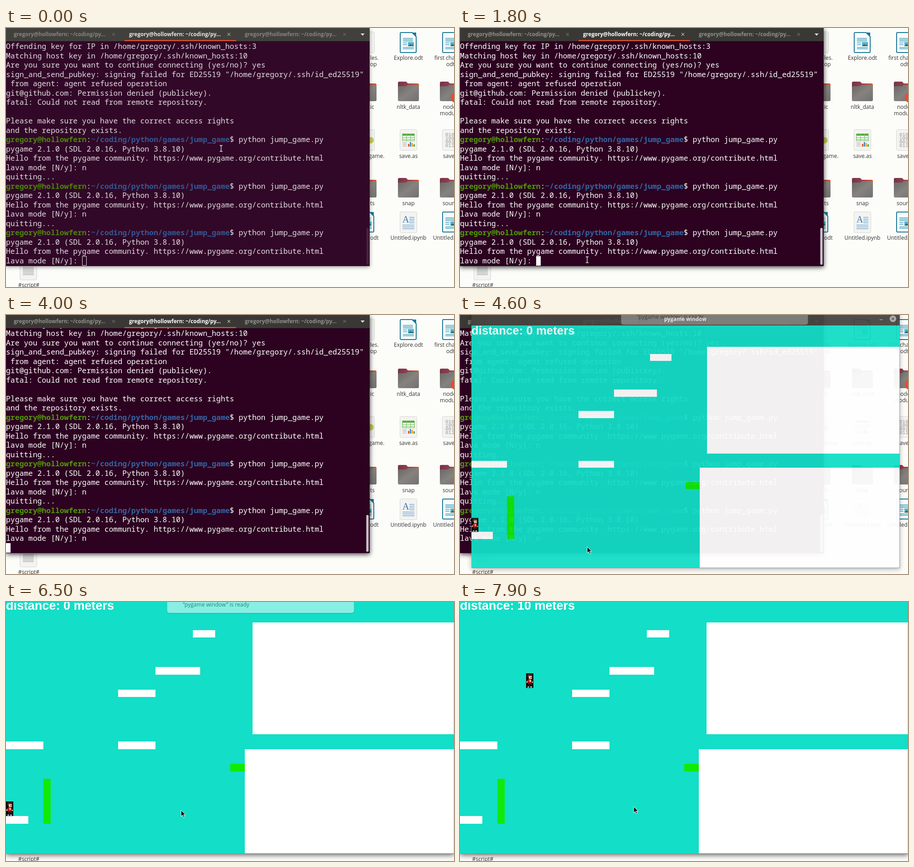
Recreate the animation shown at these times as an HTML page. Size 983 by 570 pixels, loop 8 s.

```html
<!DOCTYPE html>
<html lang="en">
<head>
<meta charset="utf-8">
<title>Jump game</title>
<style>
html, body { margin: 0; width: 100%; height: 100%; overflow: hidden; background: #fcfcf9; }
svg { display: block; width: 983px; height: 570px; }
text { white-space: pre; font: 12px "Open Sans", "Noto Sans", sans-serif; fill: #333; }
.term text { font: 16.38px "Noto Sans Mono", "DejaVu Sans Mono", monospace; fill: #fff; }
.term .user { font-weight: bold; fill: #4e9a06; }
.term .path { font-weight: bold; fill: #3465a4; }
.tabs text { font-weight: bold; font-size: 11.6px; }
.bar text { font-weight: bold; fill: #e6e5e2; }
.bar text.score { font: bold 27px "Liberation Sans", Arial, sans-serif; fill: #fff; }
.bits { font: 11px "Liberation Mono", monospace; fill: #999; }
.letter { font: 20px "Liberation Serif", serif; fill: #2f76b5; }
.level { shape-rendering: crispEdges; }
</style>
</head>
<body>
<svg id="stage" viewBox="0 0 983 570"></svg>
<script>
const stage = document.getElementById('stage');

function el(tag, attrs, parent = stage, content) {
  const node = document.createElementNS('http://www.w3.org/2000/svg', tag);
  for (const k in attrs) node.setAttribute(k, attrs[k]);
  if (content !== undefined) node.textContent = content;
  parent.append(node);
  return node;
}
const group = (parent, attrs = {}) => el('g', attrs, parent);
const rect = (p, x, y, width, height, fill, more) => el('rect', { x, y, width, height, fill, ...more }, p);
const path = (p, d, fill, more) => el('path', { d, fill, ...more }, p);
const text = (p, x, y, s, more) => el('text', { x, y, ...more }, p, s);
const show = (node, on) => node.setAttribute('visibility', on ? 'visible' : 'hidden');
const fade = (node, a) => node.setAttribute('opacity', a);

// Desktop
const defs = el('defs', {});
function gradient(id, stops, more) {
  const g = el('linearGradient', { id, ...more }, defs);
  stops.forEach((c, i) => el('stop', { offset: i / (stops.length - 1), 'stop-color': c }, g));
}
gradient('folder', ['#686765', '#85827f', '#737170'], { x2: 1, y2: 1 });
gradient('tab', ['#74334a', '#98404b', '#e3562f']);

const desk = group();
rect(desk, 0, 0, 983, 570, '#fcfcf9');

function lines(p, x, y, w, n, gap, color) {
  for (let i = 0; i < n; i++) rect(p, x, y + i * gap, w, 1.4, color);
}
function page(x, y) {
  const g = group(desk, { transform: `translate(${x} ${y})` });
  rect(g, .5, .5, 37, 46, '#f3f3f1', { rx: 3, stroke: '#d6d6d3' });
  return g;
}
function writer(x, y) {
  const g = group(desk, { transform: `translate(${x} ${y})` });
  path(g, 'M3 1H27L36 10V43Q36 45 34 45H3Q1 45 1 43V3Q1 1 3 1Z', '#fafcfc', { stroke: '#1b7899', 'stroke-width': 2 });
  path(g, 'M27 1L36 10V1Z', '#1b7899');
  lines(g, 7, 13, 22, 3, 3, '#3a9cba');
  rect(g, 7, 23, 9, 1.4, '#3a9cba');
  rect(g, 7, 27, 9, 1.4, '#3a9cba');
  rect(g, 18, 22, 13, 9, '#52b3cc');
  path(g, 'M18 31L23 26L26 29L28 27L31 31Z', '#2c6f62');
  lines(g, 7, 33, 24, 2, 3, '#3a9cba');
}
function folder(x, y) {
  const g = group(desk, { transform: `translate(${x} ${y})` });
  path(g, 'M3 0H18L22 4H43Q46 4 46 7V20H0V3Q0 0 3 0Z', 'url(#tab)');
  path(g, 'M0 12Q0 10 3 10H17L22 7H44Q46 7 46 9V40Q46 43 43 43H3Q0 43 0 40Z', 'url(#folder)');
}

page(771, 8);
writer(864, 9);
writer(957, 9);
for (const y of [118, 330]) for (const x of [767, 860, 952]) folder(x, y);
el('circle', { cx: 988, cy: 153, r: 12, fill: '#ee4a32' }, desk);

const play = page(771, 223);
el('circle', { cx: 29, cy: 24, r: 7, fill: '#c3cb55' }, play);

const sheet = page(864, 223);
rect(sheet, 6, 10, 26, 15, '#fff', { stroke: '#56a83f' });
rect(sheet, 6, 10, 26, 4, '#4dac35');
lines(sheet, 6, 17, 26, 2, 4, '#7fc46c');
for (const x of [14, 23]) rect(sheet, x, 10, 1.2, 15, '#7fc46c');
[[18, 6, '#e2572e'], [22, 10, '#3d8fc4'], [26, 8, '#e9a52d'], [30, 5, '#4dac35']]
  .forEach(([x, h, c]) => rect(sheet, x, 38 - h, 3, h, c));
lines(sheet, 6, 29, 9, 3, 3.5, '#b7b7b4');

const binary = page(957, 223);
['0100', '1001', '0010', '0110'].forEach((s, i) => text(binary, 7, 15 + i * 8, s, { class: 'bits' }));

writer(771, 404);
writer(957, 404);
const note = page(864, 404);
text(note, 6, 24, 'A', { class: 'letter' });
lines(note, 21, 12, 11, 4, 4, '#6ea3cf');
lines(note, 6, 29, 26, 3, 4, '#6ea3cf');
const script = page(30, 508);
lines(script, 7, 18, 24, 6, 3.2, '#aaa');

[[883, 70, 'Explore.odt'], [883, 178, 'nltk_data'], [883, 286, 'save.as'], [883, 390, 'snap'],
 [883, 466, 'Untitled.ipynb'], [50, 570, '#script#']]
  .forEach(([x, y, s]) => text(desk, x, y, s, { 'text-anchor': 'middle' }));
[[799, 70, 'les.'], [799, 84, 'op'], [799, 178, 'ic'], [796, 286, 'game.'], [799, 390, 'ts'], [799, 466, 'odt'],
 [940, 70, 'first chapter.'], [966, 84, 'odt'], [959, 178, 'node_'], [952, 192, 'modules'],
 [959, 286, 'save'], [958, 390, 'source'], [937, 466, 'Untitled.odt']]
  .forEach(([x, y, s]) => text(desk, x, y, s));

// Terminal
const CW = 9.83, LH = 20.5;
const who = 'gregory@hollowfern';
const home = '/home/gregory/.ssh/';
const run = [
  null,
  'pygame 2.1.0 (SDL 2.0.16, Python 3.8.10)',
  'Hello from the pygame community. https://www.pygame.org/contribute.html',
];
const ended = [...run, 'lava mode [N/y]: n', 'quitting...'];
const log = [
  `Offending key for IP in ${home}known_hosts:3`,
  `Matching host key in ${home}known_hosts:10`,
  'Are you sure you want to continue connecting (yes/no)? yes',
  `sign_and_send_pubkey: signing failed for ED25519 "${home}id_ed25519"`,
  ' from agent: agent refused operation',
  'git@github.com: Permission denied (publickey).',
  'fatal: Could not read from remote repository.',
  '',
  'Please make sure you have the correct access rights',
  'and the repository exists.',
  ...ended, ...ended, ...run, 'lava mode [N/y]: ',
];

const term = group(stage, { class: 'term' });
rect(term, 0, 0, 798, 524, '#320828', { style: 'filter:drop-shadow(0 2px 4px rgba(0,0,0,.4))' });
const focusBg = rect(term, 0, 0, 798, 524, '#2c0220', { style: 'filter:drop-shadow(0 3px 6px rgba(0,0,0,.45))' });
const screen = group(term);
const rows = log.map((s, i) => {
  const row = text(screen, 0, 46 + i * LH, s === null ? '' : s);
  if (s === null) {
    el('tspan', { class: 'user' }, row, who);
    el('tspan', {}, row, ':');
    el('tspan', { class: 'path' }, row, '~/coding/python/games/jump_game');
    el('tspan', {}, row, '$ python jump_game.py');
  }
  return row;
});
const answer = rows[rows.length - 1];
const hollow = rect(term, 167.5, 502.5, 9, 20, 'none', { stroke: '#e4e0e2' });
const block = rect(term, 0, 502, 10, 21, '#fff');
rect(term, 791, 440, 5, 81, '#45233d', { rx: 2.5 });
const scroller = rect(term, 790.5, 440, 5, 81, '#c9c3c7', { rx: 2.5 });

const tabs = group(stage, { class: 'tabs' });
rect(tabs, 0, 0, 798, 29, '#41403c');
const focusBar = rect(tabs, 0, 0, 798, 29, '#393834');
rect(tabs, 260, 26.5, 245, 2.5, '#e0502a');
const titles = [17, 270, 524].map((x, i) => {
  const fill = i === 1 ? '#fff' : '#918f89';
  const g = group(tabs);
  text(g, x, 18, who + ': ~/coding/py...', { style: `fill:${fill}` });
  path(g, `M${x + 216} 11l6 6m0 -6l-6 6`, 'none', { stroke: i === 1 ? '#b5b3ae' : '#6d6b66', 'stroke-width': 1.2 });
  return g;
});
path(tabs, 'M778 12h9l-4.5 5z', '#dddcd8');

// Game window, on a grid of 60 tiles across
const U = 983 / 60, TOP = -4;
const game = group(stage, { class: 'bar' });
const shade = rect(game, 0, -41, 983, 595, '#454440');
rect(game, 0, -41, 983, 37, '#454440');
text(game, 491, -15, 'pygame window', { 'text-anchor': 'middle' });
rect(game, 937, -18, 7, 1.3, '#b5b3ae');
el('circle', { cx: 967.5, cy: -19.5, r: 7.5, fill: '#aaa8a3' }, game);
path(game, 'M965 -22l5 5m0 -5l-5 5', 'none', { stroke: '#454440', 'stroke-width': 1.4 });
const level = group(game, { class: 'level' });
rect(level, 0, TOP, 983, 558, '#13dec7');
const tile = (fill, list) => list.forEach(([x, y, w, h]) =>
  rect(level, x * U, TOP + y * U, w * U, h * U, fill));
tile('#fff', [[25, 4, 3, 1], [20, 9, 6, 1], [15, 12, 5, 1], [0, 19, 5, 1], [15, 19, 5, 1],
  [0, 29, 3, 1], [33, 3, 27, 15], [32, 20, 28, 14]]);
tile('#10ea06', [[30, 22, 2, 1], [5, 24, 1, 6]]);
path(game, 'M0 554H983V-4', 'none', { stroke: '#85918e', 'stroke-width': 1 });
const score = text(game, 0, 17, '', { class: 'score' });

const hero = group(game);
[[0, 0, 16, 32, '#050303'], [4, 2, 9, 6, '#5e2a1c'], [3, 4, 3, 5, '#5e2a1c'], [6, 6, 7, 6, '#e8c8a6'],
 [7, 7, 5, 1, '#fff'], [10, 8, 2, 2, '#2b1a18'], [5, 12, 7, 2, '#a31818'], [3, 14, 10, 6, '#c41d1f'],
 [8, 14, 2, 5, '#fff'], [1, 17, 2, 4, '#e8c8a6'], [13, 18, 2, 3, '#e8c8a6'], [4, 20, 8, 3, '#7d1214'],
 [5, 23, 3, 5, '#33241f'], [10, 23, 2, 5, '#33241f'], [3, 29, 4, 2, '#f4f4f4'], [9, 29, 4, 2, '#f4f4f4']]
  .forEach(r => rect(hero, ...r));

const popup = group();
rect(popup, 353.5, -30, 410, 54, '#fff', { rx: 5, style: 'filter:drop-shadow(0 1px 1px rgba(0,0,0,.3))' });
text(popup, 388, 10, '“pygame window” is ready');

const beam = path(stage, 'M-3 -6.5H-1Q0 -6.5 0 -5Q0 -6.5 1 -6.5H3M0 -5.5V5.5M-3 6.5H-1Q0 6.5 0 5Q0 6.5 1 6.5H3',
  'none', { stroke: '#eee', 'stroke-width': 1.3 });
const arrow = path(stage, 'M0 0V14L3.3 11L5.6 16.2L8 15.1L5.7 10.2H10Z', '#151515', { stroke: '#fff', 'stroke-width': 1 });

// Each step: tick (100 ms), then values
const pointer = [[0, 472, 265], [3, 360, 322], [4, 366, 346], [8, 284, 430], [9, 311, 453], [14, 271, 463],
  [16, 279, 510], [52, 340, 489], [53, 389, 473], [65, 384, 458], [66, 381, 450]];
const zoom = [[0, .956, .94], [47, .99, .985], [48, 1, 1]];
const notice = [[0, 0, 0], [46, .3, -2.5], [47, .75, -1], [48, 1, 0], [65, .5, 0], [66, 0, 0]];
const at = (table, tick) => table.filter(s => s[0] <= tick).pop();
const clamp = (v, a, b) => Math.min(b, Math.max(a, v));

function draw(tick) {
  const focus = clamp((tick - 15) / 3, 0, 1);
  const entered = tick >= 40, typed = tick >= 37;
  for (const node of [focusBg, focusBar, scroller]) fade(node, focus);
  fade(screen, .86 + .14 * focus);
  titles.forEach(node => fade(node, .86 + .14 * focus));
  screen.setAttribute('transform', `translate(0 ${entered ? -LH : 0})`);
  answer.textContent = 'lava mode [N/y]: ' + (typed ? 'n' : '');
  show(hollow, tick < 16);
  show(block, tick >= 16 && !(tick >= 24 && tick < 30) && tick < 46);
  block.setAttribute('x', entered ? 0 : (typed ? 18 : 17) * CW);

  const [, size, alpha] = at(zoom, tick);
  const gap = (1 - size) / .044;
  show(game, tick >= 46);
  fade(game, alpha);
  game.setAttribute('transform', `translate(${25 * gap} ${27 * gap}) scale(${size})`);
  shade.style.filter = `drop-shadow(0 3px 6px rgba(0,0,0,${tick < 65 ? .3 : .6}))`;

  // Jump: decelerating rise, run slows after the third step
  const k = clamp(tick - 70, 0, 9);
  const x = k < 3 ? k * 24.4 : 73 + (k - 3) * 12;
  const y = 439 - (41.33 * k - k * (k + 1));
  hero.setAttribute('transform', `translate(${x} ${y})`);
  score.textContent = `distance: ${Math.floor(x / 14.5)} meters`;

  const [, shown, drop] = at(notice, tick);
  fade(popup, shown);
  popup.setAttribute('transform', `translate(0 ${drop})`);

  const [, px, py] = at(pointer, tick);
  for (const node of [beam, arrow]) node.setAttribute('transform', `translate(${px} ${py})`);
  show(beam, tick < 37);
  show(arrow, tick >= 46);
}

const start = performance.now();
function frame() {
  draw(Math.floor((performance.now() - start) % 8000 / 100));
  requestAnimationFrame(frame);
}
frame();
</script>
</body>
</html>
```
